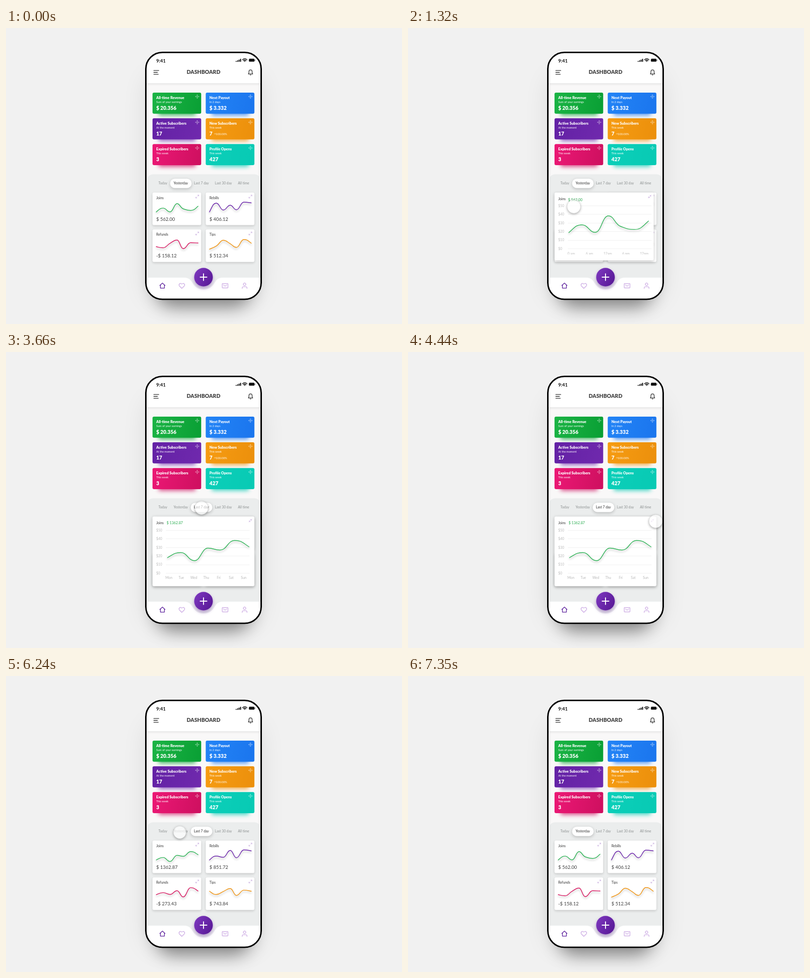
These frames come from a looping animation (800x600 px, 7500 ms). An HTML page with a canvas:

```html
<!DOCTYPE html>
<html lang="en">
<head>
<meta charset="utf-8">
<title>Dashboard</title>
<style>
html, body { margin: 0; width: 100%; height: 100%; overflow: hidden; background: #f1f1f1; }
canvas { display: block; }
</style>
</head>
<body>
<canvas id="stage" width="800" height="600"></canvas>
<script>
const LOOP = 7500;
const stage = document.getElementById('stage').getContext('2d');
const base = document.createElement('canvas');
base.width = 800;
base.height = 600;
let c = base.getContext('2d');

const lerp = (a, b, u) => a + (b - a) * u;
const clamp = u => Math.max(0, Math.min(1, u));
const ease = u => u < .5 ? 4 * u ** 3 : 1 - 4 * (1 - u) ** 3;
const span = (t, a, b) => ease(clamp((t - a) / (b - a)));
const mix = (a, b, u) => `rgb(${a.map((v, i) => Math.round(lerp(v, b[i], u)))})`;

function scoped(draw) { c.save(); draw(); c.restore(); }
function shadow(color, y, blur) {
  c.shadowColor = color;
  c.shadowOffsetY = y;
  c.shadowBlur = blur;
}
function box(x, y, w, h, r, fill) {
  c.beginPath();
  c.roundRect(x, y, w, h, r);
  c.fillStyle = fill;
  c.fill();
}
function disc(x, y, r, fill) {
  c.beginPath();
  c.arc(x, y, r, 0, 7);
  c.fillStyle = fill;
  c.fill();
}
function text(s, x, y, size, color, weight = 400, align = 'left') {
  c.font = `${weight} ${size}px Lato, "Open Sans", sans-serif`;
  c.textAlign = align;
  c.fillStyle = color;
  c.fillText(s, x, y);
}
function line(d, color, width, x = 0, y = 0) {
  scoped(() => {
    c.translate(x, y);
    c.lineCap = c.lineJoin = 'round';
    c.strokeStyle = color;
    c.lineWidth = width;
    c.stroke(new Path2D(d));
  });
}
function phonePath(inset) {
  c.beginPath();
  c.roundRect(281 + inset, 48 + inset, 236 - 2 * inset, 503.5 - 2 * inset, 35 - inset);
}

// ---------- static parts ----------
// title, subtitle, value, left and right colour
const TILES = [
  ['All-time Revenue', 'Sum of your earnings', '$ 20.356', '#1bb445', '#0aa035'],
  ['Next Payout', 'In 2 days', '$ 3.332', '#2384f6', '#1b76ee'],
  ['Active Subscribers', 'At the moment', '17', '#6321a5', '#6f29ad'],
  ['New Subscribers', 'This week', '7', '#f69c12', '#ec900c'],
  ['Expired Subscribers', 'This week', '3', '#ec1875', '#cf1060'],
  ['Profile Opens', 'This week', '427', '#0bcfb9', '#08cab4']
];

function tile([title, sub, value, left, right], i) {
  const x = 296 + i % 2 * 107.5, y = 131 + Math.floor(i / 2) * 52.1;
  scoped(() => {
    c.globalAlpha = .75;
    shadow(right, 5, 8);
    box(x + 12, y + 16, 75, 25, 3, right);
  });
  const g = c.createLinearGradient(x, y, x + 98, y + 20);
  g.addColorStop(0, left);
  g.addColorStop(1, right);
  box(x, y, 98.3, 42.7, 3, g);
  text(title, x + 7.5, y + 13, 7.3, '#fff', 900);
  text(sub, x + 7.5, y + 21.2, 5.6, '#fff');
  text(value, x + 7.5, y + 34.6, 10.3, '#fff', 900);
  if (i === 3) text('+100.00%', x + 17, y + 33.5, 5.8, '#fff');
  line('M-3.6 0H3.6M0-3.6V3.6M-2.6-1L-3.6 0L-2.6 1M2.6-1L3.6 0L2.6 1M-1-2.6L0-3.6L1-2.6M-1 2.6L0 3.6L1 2.6',
    'rgba(255,255,255,.6)', .7, x + 90.3, y + 8);
}

function drawBase() {
  c.fillStyle = '#f1f1f1';
  c.fillRect(0, 0, 800, 600);
  scoped(() => {
    shadow('rgba(0,0,0,.10)', 14, 50);
    box(284, 80, 230, 460, 34, '#000');
    shadow('rgba(0,0,0,.42)', 14, 34);
    box(304, 300, 190, 252, 34, '#000');
  });
  scoped(() => {
    phonePath(0);
    c.fillStyle = '#fff';
    c.fill();
    c.clip();
    c.fillStyle = '#f9f8f8';
    c.fillRect(281, 112, 236, 200);
    scoped(() => {
      shadow('rgba(0,0,0,.12)', 1, 5);
      c.fillStyle = '#fff';
      c.fillRect(281, 40, 236, 72);
    });
    box(285, 296.5, 229, 280, 12, '#ebeded');
    c.fillStyle = '#fff';
    c.fill(new Path2D('M281 506H360C370 506 373 511 377 517C383 527 391 530 399 530S415 527 421 517C425 511 428 506 438 506H517V552H281Z'));
  });
  phonePath(1.5);
  c.lineWidth = 3;
  c.strokeStyle = '#000';
  c.stroke();

  text('9:41', 303.5, 69.6, 9.5, '#111', 700);
  for (let i = 0; i < 4; i++) box(464 + i * 3, 66.8 - i * 1.4, 2, 1.8 + i * 1.4, .5, '#111');
  line('M477.8 64.3Q482.3 60.3 486.8 64.3M479.7 66.3Q482.3 64 484.9 66.3', '#111', 1.5);
  disc(482.3, 67.6, 1.1, '#111');
  box(490.7, 62.3, 11.3, 6, 1.6, '#111');
  box(502.6, 64.3, 1, 2, .5, '#111');
  line('M298.5 86.2H308.7M298.5 90H306M298.5 93.8H307.8', '#333', 1.3);
  line('M489.6 93.2H498.4C497 91.8 497.2 90.5 497.2 88.5C497.2 86 495.8 84.8 494 84.8S490.8 86 490.8 88.5C490.8 90.5 491 91.8 489.6 93.2ZM493 95.2H495', '#333', 1.3);
  text('DASHBOARD', 399, 93, 10.7, '#444', 900, 'center');

  TILES.forEach(tile);

  line('M-5.3-.4L0-5.2L5.3-.4M-4-1.3V5H4V-1.3', '#5b1f9c', 1.3, 316, 522.3);
  line('M0 5.3L-4.7.7C-7.5-2.5-3-7.2 0-3.3C3-7.2 7.5-2.5 4.7.7Z', '#c9a6e2', 1.2, 355.2, 522.5);
  line('M-5-4.4H5Q5.8-4.4 5.8-3.6V3.6Q5.8 4.4 5 4.4H-5Q-5.8 4.4-5.8 3.6V-3.6Q-5.8-4.4-5-4.4ZM-3.2-1.6L0 .9L3.2-1.6', '#c9a6e2', 1.2, 442.6, 522.5);
  line('M0-5.4A2.6 2.6 0 1 1-.01-5.4ZM-4.8 5.6V4.4Q-4.8 2.2-2.6 2.2H2.6Q4.8 2.2 4.8 4.4V5.6', '#c9a6e2', 1.2, 482, 522.3);

  scoped(() => {
    shadow('rgba(91,26,147,.4)', 4, 7);
    const g = c.createLinearGradient(382, 495, 416, 515);
    g.addColorStop(0, '#7a35bb');
    g.addColorStop(1, '#5a1a98');
    disc(399, 505, 18.8, g);
  });
  line('M392.3 505H405.7M399 498.3V511.7', '#fff', 1.9);
}

// ---------- moving parts ----------
const TABS = [['Today', 308], ['Yesterday', 338.5], ['Last 7 day', 379.5], ['Last 30 day', 422], ['All time', 468.5]];
const KNOTS = [7.5, 21.5, 35.5, 49.5, 62, 77, 92];
// name, colour, value and curve of either period
const CHARTS = [
  ['Joins', '#2fb457', [562, 1362.87], [39.5, 31.6, 39.2, 22.5, 33, 36.3, 27.8], [39.5, 34.4, 42.4, 30, 32, 22.5, 28.8]],
  ['Rebills', '#6a23aa', [406.12, 851.72], [39.5, 21.5, 35.5, 25.8, 35, 19.5, 21], [39.5, 31.5, 34, 20, 35, 19, 21]],
  ['Refunds', '#d8155f', [-158.12, -273.43], [35, 37.2, 28, 21.5, 39, 27, 27.5], [35, 30.8, 34.5, 27, 39.5, 20.8, 27.5]],
  ['Tips', '#f0930f', [512.34, 743.84], [40, 33.5, 22, 29, 36.5, 20.5, 28], [28, 34.5, 28.5, 22.5, 36.5, 25.8, 28]]
];
const HOURS = ['0 am', '6 am', '12am', '6 pm', '12pm'];
const DAYS = ['Mon', 'Tue', 'Wed', 'Thu', 'Fri', 'Sat', 'Sun'];

// Smooth line with broad, rounded peaks that never overshoots its points
function curve(pts, color) {
  const n = pts.length - 1;
  const d = pts.slice(1).map(([x, y], i) => (y - pts[i][1]) / (x - pts[i][0]));
  const m = pts.map((_, i) => {
    const a = d[i - 1], b = d[i];
    return a * b > 0 ? 2 * a * b / (a + b) : 0;
  });
  m[0] = 1.5 * d[0] - m[1] / 2;
  m[n] = 1.5 * d[n - 1] - m[n - 1] / 2;
  scoped(() => {
    shadow('rgba(0,0,0,.28)', 3, 4);
    c.beginPath();
    c.moveTo(...pts[0]);
    for (let i = 0; i < n; i++) {
      const [x, y] = pts[i], [X, Y] = pts[i + 1], h = (X - x) * .46;
      c.bezierCurveTo(x + h, y + m[i] * h, X - h, Y - m[i + 1] * h, X, Y);
    }
    c.lineCap = 'round';
    c.lineWidth = 1.4;
    c.strokeStyle = color;
    c.stroke();
  });
}

function sizeIcon(x, y, open) {
  const out = 'M.8-.8L3-3M.9-3H3V-.9M-.8.8L-3 3M-.9 3H-3V.9';
  const into = 'M.8-.8L3-3M.8-2.7V-.8H2.7M-.8.8L-3 3M-.8 2.7V.8H-2.7';
  line(open > .5 ? into : out, '#c6aadd', .8, x, y);
}

function axes(p, q, x, y, h) {
  scoped(() => {
    c.beginPath();
    c.rect(x, y, 205, h - 12);
    c.clip();
    c.globalAlpha = p;
    for (let i = 0; i < 6; i++) {
      const gy = 361 + i * 17.45 - (1 - p) * 20;
      text('$' + (50 - i * 10), x + 7.5, gy + 2.6, 7, '#bcbcbc');
      c.fillStyle = '#f1f1f1';
      c.fillRect(323, Math.round(gy), 169, 1);
    }
    c.globalAlpha = p * (1 - q);
    HOURS.forEach((s, i) => text(s, 329.7 + i * 36.9, 460.2, 6.8, '#b8b8b8', 400, 'center'));
    c.globalAlpha = p * q;
    DAYS.forEach((s, i) => text(s, 329 + i * 25.2, 460.2, 6.8, '#b8b8b8', 400, 'center'));
  });
}

function chart(i, p, q) {
  const [name, color, value, before, after] = CHARTS[i];
  const x = 296 + i % 2 * 107.5, y = i < 2 ? 333.5 : 408.3;
  const w = lerp(98.3, 205.7, p), h = lerp(66, 141.2, p);
  scoped(() => {
    shadow(`rgba(0,0,0,${lerp(.16, .24, p)})`, 2, lerp(5, 7, p));
    box(x, y, w, h, 3, '#fff');
  });
  if (p > 0) axes(p, q, x, y, h);
  text(name, x + 7.5, y + lerp(13, 15.3, p), 6.8, '#333');
  sizeIcon(x + w - 8, y + 8.2, p);
  const amount = lerp(...value, q);
  text((amount < 0 ? '-' : '') + '$ ' + Math.abs(amount).toFixed(2),
    x + lerp(7.5, 28.5, p), y + lerp(57, 15.5, p), lerp(9.5, 7.2, p), mix([62, 62, 62], [38, 172, 78], p));
  curve(KNOTS.map((k, j) => {
    const v = lerp(before[j], after[j], q);
    return [x + lerp(k, 30 + (k - 7.5) * 1.953, p), y + lerp(v, 83.5 + (v - 39.5) * 2.06, p)];
  }), color);
}

function tabs(q) {
  scoped(() => {
    shadow('rgba(0,0,0,.22)', 2, 6);
    box(lerp(331.5, 373.2, q), 305.5, 43.5, 19, 9.5, '#fff');
  });
  TABS.forEach(([s, x], i) => {
    const on = i === 1 ? 1 - q : i === 2 ? q : 0;
    text(s, x, 317.4, 6.8, mix([140, 144, 144], [45, 45, 45], on));
  });
}

// start, end, from, bend, to
const MOVES = [
  [510, 960, [262, 425], [295, 370], [335, 362]],
  [1710, 2900, [335, 362], [415, 420], [395, 316]],
  [4050, 4530, [395, 316], [450, 335], [503, 343.5]],
  [5000, 5940, [503, 343.5], [500, 422], [351, 317]],
  [6450, 7350, [351, 317], [497, 195], [481, 28]]
];
const TAPS = [960, 2930, 4680, 6255];

function pointer(t) {
  if (t < 510 || t >= 7350) return;
  const [a, b, from, bend, to] = MOVES.filter(m => t >= m[0]).pop();
  const s = b === 7350 ? clamp((t - a) / (b - a)) ** 1.3 : span(t, a, b);
  const [x, y] = from.map((v, i) => (1 - s) ** 2 * v + 2 * s * (1 - s) * bend[i] + s * s * to[i]);
  const press = Math.max(...TAPS.map(k => 1 - Math.abs(t - k) / 60), 0);
  const r = 13.4 - press;
  scoped(() => {
    phonePath(0);
    c.clip();
    scoped(() => {
      c.beginPath();
      c.rect(0, 0, 800, 600);
      c.arc(x, y, r, 0, 7);
      c.clip('evenodd');
      shadow('rgba(0,0,0,.38)', 1.5, 5);
      disc(x, y, r, '#fff');
    });
    disc(x, y, r, 'rgba(255,255,255,.68)');
    c.strokeStyle = 'rgba(0,0,0,.1)';
    c.lineWidth = .8;
    c.stroke();
  });
}

function frame(now) {
  const t = now % LOOP;
  const p = span(t, 960, 1430) - span(t, 4830, 5450);
  const q = span(t, 2970, 3480) - span(t, 6450, 7050);
  c.drawImage(base, 0, 0);
  tabs(q);
  for (let i = 3; i >= 0; i--) chart(i, i ? 0 : p, q);
  pointer(t);
  requestAnimationFrame(frame);
}

drawBase();
c = stage;
requestAnimationFrame(frame);
</script>
</body>
</html>
```
